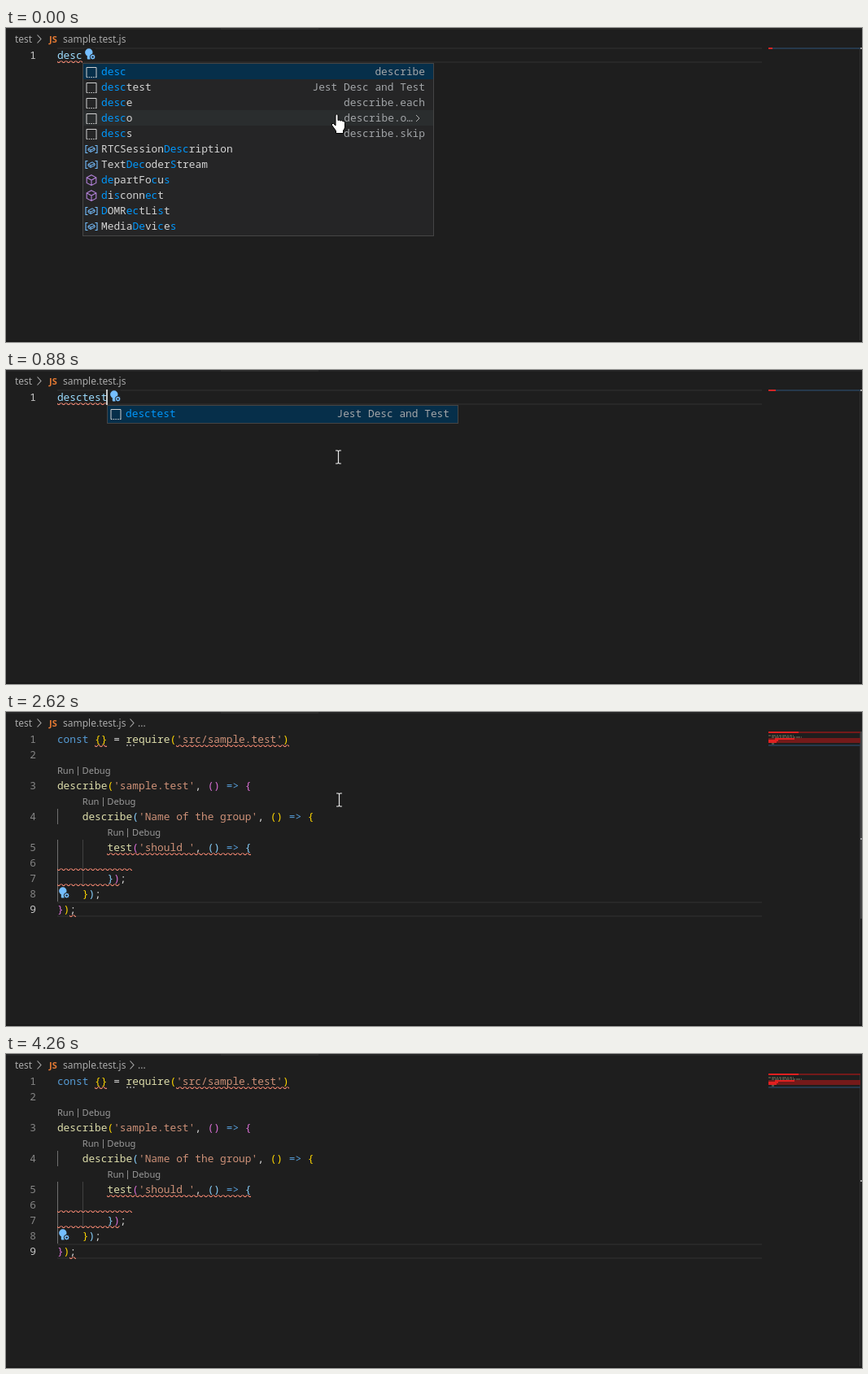
An HTML page that plays this animation: 1052 px wide and 386 px high, repeating every 4360 ms.

```html
<!DOCTYPE html>
<html lang="en">
<head>
<meta charset="utf-8">
<title>Snippet completion</title>
<style>
  html, body { margin: 0; width: 100%; height: 100%; overflow: hidden; background: #1e1e1e; }
  svg { display: block; width: 1052px; height: 386px; }
  text { white-space: pre; }
  .mono { font: 12.83px "Noto Sans Mono", "DejaVu Sans Mono", monospace; }
  .ui { font: 12px "Noto Sans", "Open Sans", sans-serif; fill: #a9a9a9; }
  .lens { font: 11.2px "Noto Sans", "Open Sans", sans-serif; fill: #999; }
  .hit { fill: #0097fb; }
</style>
</head>
<body>
<svg id="stage" viewBox="0 0 1052 386" xmlns="http://www.w3.org/2000/svg"></svg>
<script>
const LOOP = 4360, LEFT = 62.9, CHAR = 7.698, TOP = 24, ROW = 19;
const colX = c => LEFT + c * CHAR;
const rowY = r => TOP + r * ROW;

const rect = (x, y, w, h, fill, extra = '') =>
  `<rect x="${x}" y="${y}" width="${w}" height="${h}" fill="${fill}" ${extra}/>`;
const label = (x, y, s, fill, cls = 'mono', extra = '') =>
  `<text class="${cls}" x="${x}" y="${y}" ${fill ? `fill="${fill}"` : ''} ${extra}>${s}</text>`;
const path = (d, stroke, fill = 'none', extra = '') =>
  `<path d="${d}" stroke="${stroke}" fill="${fill}" ${extra}/>`;
const move = (x, y, s) => `<g transform="translate(${x} ${y})">${s}</g>`;

// Code

const SOURCE = [
  "const {} = require('src/sample.test')",
  "",
  "describe('sample.test', () => {",
  "    describe('Name of the group', () => {",
  "        test('should ', () => {",
  "            ",
  "        });",
  "    });",
  "});"
];
const BRACKETS = ['#ffd700', '#da70d6', '#87cefa'];

function codeText(rows, rainbow) {
  let depth = 0;
  const color = (s, line) => {
    if (/[({]/.test(s)) return rainbow ? BRACKETS[depth++ % 3] : '#d4d4d4';
    if (/[)}]/.test(s)) return rainbow ? BRACKETS[--depth % 3] : line === 8 ? '#9cdcfe' : '#d4d4d4';
    if (s[0] === "'") return '#ce9178';
    if (s === 'const' || s === '=>') return '#569cd6';
    return /\w/.test(s) ? '#dcdcaa' : '#d4d4d4';
  };
  return SOURCE.map((src, i) =>
    [...src.matchAll(/'[^']*'|=>|\w+|[^\s\w]/g)].map(m =>
      label(colX(m.index), rowY(rows[i]) + 14, m[0].replace('>', '&gt;'), color(m[0], i))
    ).join('')).join('');
}

const numbers = rows => rows.map((r, i) =>
  label(37, rowY(r) + 14, i + 1, i === rows.length - 1 ? '#c6c6c6' : '#858585', 'mono', 'text-anchor="end"')).join('');

const currentLine = r =>
  rect(63, rowY(r), 866, 2, '#282828') + rect(63, rowY(r) + 17, 866, 2, '#282828');

const squiggle = (row, from, to) =>
  move(Math.round(colX(from)), rowY(row) + 16, rect(0, 0, Math.round((to - from) * CHAR), 3, 'url(#wave)'));

const squiggles = rows =>
  [[0, 6, 8], [0, 19, 37], [4, 8, 31], [5, 0, 12], [6, 0, 10], [8, 2, 3]]
    .map(([i, a, b]) => squiggle(rows[i], a, b)).join('');

const guide = (x, row, n, fill) => rect(x, rowY(row), 1, n * ROW, fill);

const lens = (row, col) => {
  const x = colX(col), y = rowY(row) + 14;
  return label(x, y, 'Run', '', 'lens') + rect(Math.round(x + 25), y - 9, 1, 11, '#8a8a8a') +
    label(x + 30.6, y, 'Debug', '', 'lens');
};

const bulb = (x, y) => move(x, y,
  rect(-7, -7, 14, 14, '#1e1e1e') +
  `<circle cx="-1.2" cy="-2" r="4.7" fill="#75beff"/>` +
  rect(-3.2, 1.5, 4, 5, '#75beff', 'rx="1"') +
  `<circle cx="3.6" cy="3.6" r="3.3" fill="#75beff" stroke="#1e1e1e"/>` +
  `<circle cx="3.6" cy="3.6" r="1.2" fill="#1e1e1e"/>`);

const caret = (col, row) => rect(Math.round(colX(col)) - 1, rowY(row), 2, ROW, '#c8c8c6');

const typed = n =>
  label(colX(0), rowY(0) + 14, 'desctest'.slice(0, n), '#9cdcfe') + squiggle(0, 0, n) +
  rect(937, 24, n + 1, 2, '#d42626');

// Suggestion list

const ICONS = {
  snippet: path('M-6 6.5V-5.5H6V6.5', '#d0d0d0') +
    path('M-6 6.5H7', '#d0d0d0', 'none', 'stroke-dasharray="1.5 1.2"'),
  variable: path('M-4.5-4.5H-7V4.5H-4.5M4.5-4.5H7V4.5H4.5', '#75beff', 'none', 'stroke-width="1.1"') +
    path('M-4-.5L1-3.2L4-1.2V1L-1 3.4L-4 1.5ZM-4-.5L-1 1L4-1.2M-1 1V3.4', '#75beff'),
  method: path('M0-6.3L5.8-3.2V3.4L0 6.5L-5.8 3.4V-3.2ZM-5.8-3.2L0 0L5.8-3.2M0 0V6.5', '#b180d7', 'none', 'stroke-width="1.1"')
};

// Asterisks enclose the matched letters.
const marked = s => s.split('*').map((p, i) => p && `<tspan${i % 2 ? ' class="hit"' : ''}>${p}</tspan>`).join('');

function popup(x, items, hover = -1) {
  const h = items.length * ROW + 3;
  return rect(x + .5, 43.5, 431, h, '#252526', 'stroke="#454545"') +
    items.map(([icon, name, detail], i) => {
      const y = 44 + i * ROW, last = i === items.length - 1;
      const back = i === 0 ? '#062f4a' : i === hover ? '#2a2d2e' : '';
      const more = detail && detail.endsWith('…');
      return (back ? rect(x + 1, y, 430, ROW + (last ? 2 : 0), back) : '') +
        move(x + 11, y + 10, ICONS[icon]) +
        label(x + 23, y + 14, marked(name), '#d4d4d4') +
        (detail ? label(x + (more ? 406 : 421), y + 14, detail, '#a2a5a8', 'mono', 'text-anchor="end"') : '') +
        (more ? path(`M${x + 410} ${y + 6}l4 4l-4 4`, '#b0b0b0') : '');
    }).join('');
}
const jest = name => ['snippet', name, 'Jest Desc and Test'];

// Minimap, scroll bar, breadcrumbs

const miniLine = r => rect(937, 24 + 2 * r, 113, 2, '#26394c');

function minimap() {
  const words = [2, 3, 7, 8].map(i => {
    const indent = SOURCE[i].search(/\S/);
    return path(`M${937 + indent} ${25 + 2 * i}H${937 + SOURCE[i].length}`, '#77775f', 'none',
      'stroke-dasharray="3 1 5 1 2 1" stroke-width="1.2"');
  }).join('');
  return rect(937, 24, 113, 2, '#741a1a') + rect(937, 24, 37, 2, '#e02020') + words +
    rect(937, 32, 113, 6, '#741a1a') + rect(945, 32, 24, 2, '#e02020') +
    rect(937, 34, 12, 2, '#e02020') + rect(937, 36, 10, 2, '#e02020') + miniLine(8);
}
const scrollbar = bottom => rect(1050, 24, 2, bottom - 24, '#424242');
const rulerMark = y => rect(1050, y, 2, 2, '#a0a0a0');
const chevron = x => path(`M${x} 8.5l4.5 5l-4.5 5`, '#a9a9a9', 'none', 'stroke-width="1.1"');

// Pointers

const hand = (x, y) => move(x, y, path(
  'M-3 1.2Q-1.5-1 0 1.2V7.5Q1.5 6.5 3 8Q4.5 7 6 8.6Q8.3 8 8.5 10.5V16Q8 18.5 6.5 20V23.5H-2.5V20.5L-7.5 13.5Q-8.5 10.5-5.5 11.5L-3 14Z',
  '#000', '#fff'));
const beam = (x, y) => move(x, y, path('M-3.5-8H-1L0-7L1-8H3.5M0-7V7M-3.5 8H-1L0 7L1 8H3.5', '#e8e8e8', 'none', 'stroke-width="1.2"'));
const arrow = (x, y) => move(x, y, path('M.5.5V16.5L4.2 13L6.8 18.5L9 17.5L6.5 12H11.5Z', '#000', '#fff'));

// Timeline: [from, to, markup]

const PLAIN = [0, 1, 2, 3, 4, 5, 6, 7, 8];
const LENSED = [0, 1, 3, 5, 7, 8, 9, 10, 11];
const ACTIVE = '#707070', DIM = '#404040';

const scenes = [
  [0, LOOP,
    rect(0, 0, 1052, 2, '#252526') + rect(264, 0, 120, 2, '#2d2d2d') + rect(0, 384, 1052, 2, '#191919') +
    rect(1049, 24, 1, 360, '#303031') +
    label(11, 18, 'test', '', 'ui') + chevron(38.5) +
    label(53, 17.5, 'JS', '', 'ui', 'style="font-size:11px;font-weight:700;fill:#e37933"') +
    label(70, 18, 'sample.test.js', '', 'ui')],

  [0, 1180, currentLine(0) + numbers([0]) + miniLine(0) + rulerMark(24)],
  [0, 150, typed(4) + bulb(103, 32) + popup(94, [
    ['snippet', '*desc*', 'describe'],
    jest('*desc*test'),
    ['snippet', '*desc*e', 'describe.each'],
    ['snippet', '*desc*o', 'describe.o…'],
    ['snippet', '*desc*s', 'describe.skip'],
    ['variable', 'RTCSession*Desc*ription'],
    ['variable', 'Text*Dec*oder*S*tream'],
    ['method', '*de*partFo*c*u*s*'],
    ['method', '*d*i*s*conn*ec*t'],
    ['variable', '*D*OMR*ec*tLi*s*t'],
    ['variable', 'Media*De*vi*c*e*s*']
  ], 3)],
  [150, 300, typed(5) + caret(5, 0) + popup(101, [
    jest('*desct*est'),
    ['variable', 'RTCSession*Desc*rip*t*ion'],
    ['variable', 'Text*Dec*oder*St*ream'],
    ['method', '*d*i*s*conn*ect*'],
    ['variable', '*D*OMR*ect*Li*s*t']
  ], 3)],
  [300, 450, typed(6) + caret(6, 0) + popup(109, [
    jest('*descte*st'), ['variable', 'Text*Dec*oder*St*r*e*am']
  ])],
  [450, 600, typed(7) + caret(7, 0)],
  [450, 730, popup(117, [jest('*desctes*t')])],
  [600, 1180, typed(8) + caret(8, 0)],
  [730, 1180, popup(124, [jest('*desctest*')])],
  [880, 1180, bulb(134, 32)],

  [1180, LOOP, minimap()],
  [1180, 1450,
    currentLine(8) + numbers(PLAIN) + guide(63, 3, 5, ACTIVE) + guide(94, 4, 3, DIM) +
    squiggles(PLAIN) + caret(3, 8) + scrollbar(279) + rulerMark(130)],
  [1180, 1300, codeText(PLAIN, false) + bulb(134, 32)],
  [1300, 1450, codeText(PLAIN, true)],

  [1450, LOOP,
    chevron(152.5) + label(162, 18, '...', '', 'ui') +
    currentLine(11) + numbers(LENSED) +
    guide(63, 5, 1, ACTIVE) + guide(63, 7, 4, ACTIVE) + guide(94, 7, 3, DIM) +
    lens(2, 0) + lens(4, 4) + lens(6, 8) +
    codeText(LENSED, true) + squiggles(LENSED) + bulb(71, 222)],
  [1450, 3500, scrollbar(254)],
  [1450, LOOP, rulerMark(155)],
  [1720, LOOP, [149, 153, 157].map(x => `<circle cx="${x}" cy="41" r="1" fill="#a0a0a0"/>`).join('')],
  ...[[1450, 1600], [2100, 2620], [3080, 3650], [4120, 4260]].map(([a, b]) => [a, b, caret(3, 11)]),
  [2780, 3500, rect(930, 24, 119, 38, '#fff', 'opacity=".02"')],

  [0, 300, hand(408, 106)],
  [300, 2620, beam(408.5, 107)],
  [2620, 2780, beam(409.5, 108)],
  [2780, 2930, arrow(960, 357)],
  [2930, 3080, arrow(964, 361)]
];

const stage = document.getElementById('stage');
stage.innerHTML =
  `<defs><pattern id="wave" width="6" height="3" patternUnits="userSpaceOnUse"><g fill="#f48771">
    <path d="M5.5 0L2.5 3H1.1L4.1 0ZM4 0L6 2V.6L5.4 0ZM0 2L1 3H2.4L0 .6Z"/></g></pattern></defs>` +
  rect(0, 0, 1052, 386, '#1e1e1e') +
  scenes.map(s => `<g class="scene">${s[2]}</g>`).join('');
const groups = stage.querySelectorAll('.scene');

const start = performance.now();
function draw() {
  const t = Math.max(0, performance.now() - start) % LOOP;
  scenes.forEach(([from, to], i) => {
    groups[i].style.display = t >= from && t < to ? '' : 'none';
  });
  requestAnimationFrame(draw);
}
draw();
</script>
</body>
</html>
```
